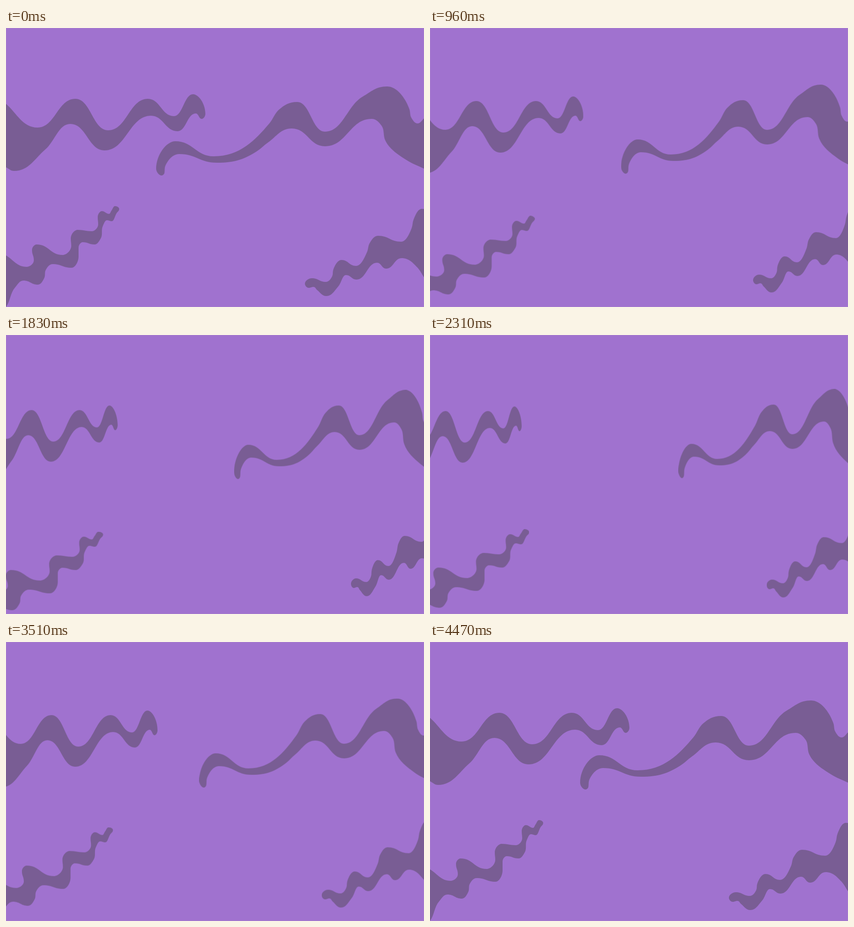
An HTML page for the animation above (4500 ms loop, 916 px wide and 611 px high).

```html
<!DOCTYPE html>
<html lang="en">
<head>
<meta charset="utf-8">
<title>Purple waves</title>
<style>
  html, body { margin: 0; width: 100%; height: 100%; overflow: hidden; background: #a072cf; }
  svg { display: block; width: 916px; height: 611px; }
  rect { fill: #a072cf; stroke: #a77fcd; }
  path { fill: #795d94; }
</style>
</head>
<body>
<svg id="stage" viewBox="0 0 916 611"><rect x=".5" y=".5" width="915" height="610"/></svg>
<script>
  const LOOP = 4500;
  const stage = document.getElementById('stage');

  // Crests and troughs run level, side bulges run upright, other points follow their neighbours
  function tangent([px, py], [x, y], [nx, ny]) {
    const ax = x - px, ay = y - py, bx = nx - x, by = ny - y;
    if (ay * by <= 0) return { x: Math.sign(nx - px), y: 0, k: .47 };
    if (ax * bx <= 0) return { x: 0, y: Math.sign(ny - py), k: .5 };
    const a = ax * ax + ay * ay, b = bx * bx + by * by;
    const tx = ax / a + bx / b, ty = ay / a + by / b, len = Math.hypot(tx, ty);
    return { x: tx / len, y: ty / len, k: .36 };
  }

  function outline(points) {
    const n = points.length;
    const at = i => points[(i + n) % n];
    const dirs = points.map((p, i) => tangent(at(i - 1), p, at(i + 1)));
    let d = `M${points[0]}`;
    points.forEach(([x, y], i) => {
      const [ex, ey] = at(i + 1), t = dirs[i], u = dirs[(i + 1) % n];
      const reach = v => v.k * Math.abs(v.x * (ex - x) + v.y * (ey - y));
      const s = reach(t), e = reach(u);
      d += `C${[x + t.x * s, y + t.y * s, ex - u.x * e, ey - u.y * e, ex, ey]}`;
    });
    return d + 'Z';
  }

  // Each wave stretches about x and shifts by dy until the turn, then returns by the end
  function wave({ x, scale, dy, turn, end }, points) {
    const el = document.createElementNS(stage.namespaceURI, 'path');
    el.setAttribute('d', outline(points));
    el.style.transformOrigin = `${x}px 0px`;
    stage.append(el);
    const rest = 'translate(0px, 0px) scale(1, 1)';
    el.animate([
      { transform: rest, offset: 0 },
      { transform: `translate(0px, ${dy}px) scale(${scale}, 1)`, offset: turn / LOOP },
      { transform: rest, offset: end / LOOP },
      { transform: rest, offset: 1 }
    ], { duration: LOOP, iterations: Infinity });
  }

  wave({ x: -132, scale: .579, dy: 11.7, turn: 2280, end: 4470 }, [
    [-40, 128], [0, 166], [69, 218], [152, 155], [224, 224], [311, 155], [368, 193],
    [410, 145], [437, 188], [429, 199], [416, 187], [376, 226], [318, 192],
    [216, 268], [141, 210], [86, 266], [18, 313], [0, 305], [-40, 290]
  ]);

  wave({ x: 992, scale: .675, dy: -9.6, turn: 2310, end: 4448 }, [
    [345, 321], [349, 302], [379, 276], [462, 295], [548, 271], [575, 250], [626, 220],
    [699, 259], [801, 199], [823, 214], [831, 246], [879, 290], [916, 308], [960, 330],
    [960, 160], [916, 198], [902, 209], [888, 196], [884, 178], [835, 128], [782, 150],
    [699, 227], [638, 162], [599, 178], [577, 209], [455, 281], [371, 248], [329, 308], [341, 323]
  ]);

  wave({ x: 552, scale: 1.12, dy: 42.1, turn: 1895, end: 4470 }, [
    [-30, 480], [0, 498], [45, 523], [61, 509], [57, 486], [67, 474], [124, 497], [143, 477],
    [142, 461], [157, 442], [188, 445], [202, 430], [201, 414], [210, 401], [226, 407],
    [231, 400], [239, 390], [248, 396], [242, 406], [232, 423], [221, 421], [212, 434],
    [208, 460], [194, 474], [168, 469], [159, 481], [159, 500], [144, 525], [102, 517],
    [87, 530], [84, 547], [70, 562], [38, 553], [20, 568], [0, 611], [-30, 640]
  ]);

  wave({ x: 1034, scale: .7335, dy: -15.1, turn: 1830, end: 4470 }, [
    [655, 560], [670, 548], [701, 556], [715, 543], [717, 530], [735, 508], [767, 521],
    [791, 491], [797, 471], [815, 455], [866, 468], [889, 438], [893, 420], [911, 396],
    [950, 420], [950, 600], [916, 546], [901, 524], [867, 504], [833, 527], [813, 514],
    [768, 551], [745, 541], [728, 566], [702, 587], [682, 574], [674, 567], [663, 569]
  ]);
</script>
</body>
</html>
```
